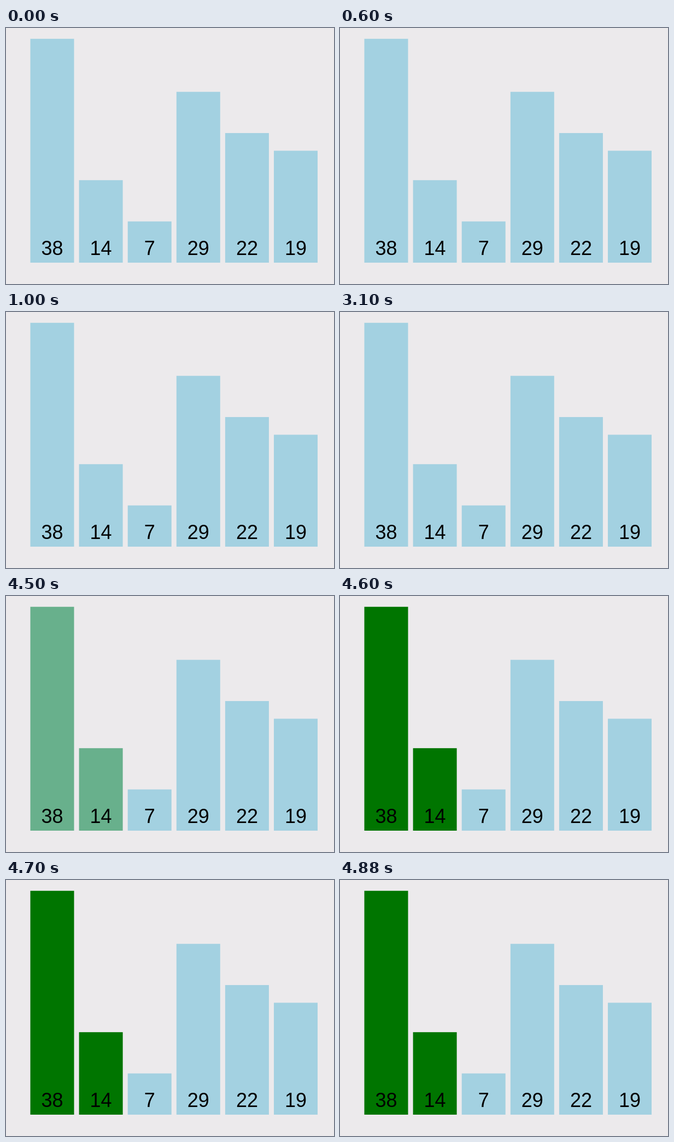
These frames come from a looping animation (600 px wide and 468 px high, 5 s). An HTML page with a canvas:

```html
<!DOCTYPE html>
<html lang="en">
<head>
<meta charset="utf-8">
<title>Bar chart</title>
<style>
  html, body { margin: 0; width: 100%; height: 100%; overflow: hidden; background: #eceaec; }
  canvas { display: block; }
</style>
</head>
<body>
<canvas id="stage" width="600" height="468"></canvas>
<script>
const ctx = document.getElementById("stage").getContext("2d");
const LOOP = 5000;
const VALUES = [38, 14, 7, 29, 22, 19];
const COMPARED = 2;
const BASE = 429, UNIT = 10.77, LEFT = 44.5, STEP = 89.1, BAR_WIDTH = 80;
const IDLE = "#a3d1e1", FADING = "#68b08c", ACTIVE = "#007500";

function highlight(time) {
  if (time < 4500) return IDLE;
  return time < 4600 ? FADING : ACTIVE;
}

function drawBar(value, index, color) {
  const x = LEFT + index * STEP;
  const height = value * UNIT;
  ctx.fillStyle = color;
  ctx.fillRect(x, BASE - height, BAR_WIDTH, height);
  ctx.fillStyle = "#000";
  ctx.fillText(value, x + BAR_WIDTH / 2, 415);
}

function draw(time) {
  ctx.fillStyle = "#eceaec";
  ctx.fillRect(0, 0, 600, 468);
  ctx.font = '36px "Liberation Sans", Helvetica, Arial, sans-serif';
  ctx.textAlign = "center";
  VALUES.forEach((value, i) => drawBar(value, i, i < COMPARED ? highlight(time) : IDLE));
}

const start = performance.now();
function tick() {
  draw((performance.now() - start) % LOOP);
  requestAnimationFrame(tick);
}
tick();
</script>
</body>
</html>
```
